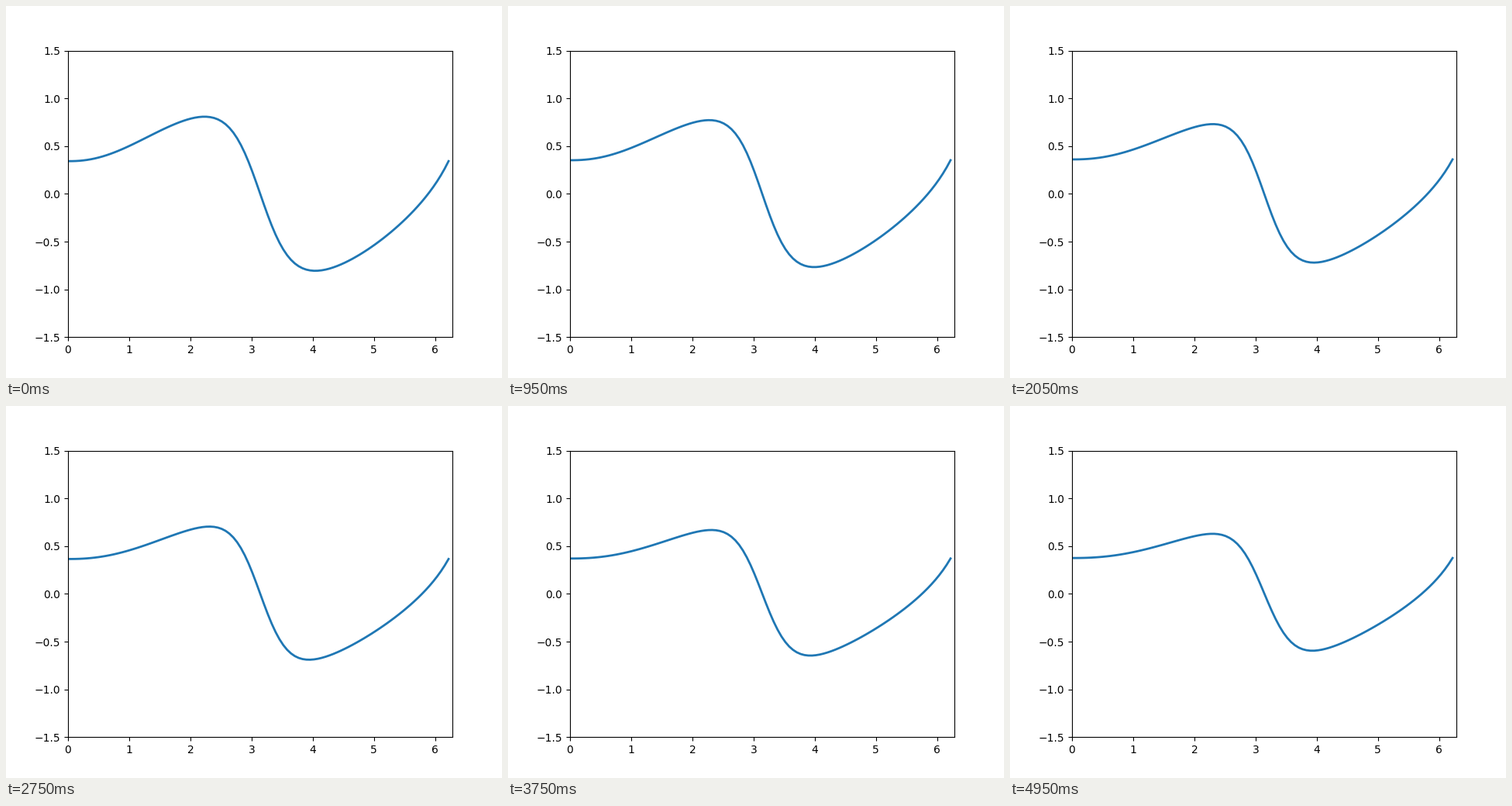
Animation, 640 px wide and 480 px high, one loop 5 s. Source, as a matplotlib script:

```python
import numpy as np
import matplotlib.pyplot as plt
from matplotlib.animation import FuncAnimation

POINTS = 100
FRAMES = 100
WARMUP = 103
DT = 0.01
LENGTH = 2 * np.pi

x = np.linspace(0, LENGTH, POINTS, endpoint=False)
dx = x[1] - x[0]


def step(u):
    """Advance the Burgers equation by one Lax-Friedrichs step."""
    flux = u**2 / 2
    new = np.empty_like(u)
    new[1:-1] = (u[2:] + u[:-2]) / 2 - DT / (2 * dx) * (flux[2:] - flux[:-2])
    new[0] = new[1]
    new[-1] = new[0]
    return new


def solve():
    u = np.sin(x)
    for _ in range(WARMUP):
        u = step(u)
    waves = [u]
    while len(waves) < FRAMES:
        waves.append(step(waves[-1]))
    return waves


waves = solve()

fig, ax = plt.subplots(figsize=(6.4, 4.8), dpi=100)
ax.set_xlim(0, LENGTH)
ax.set_ylim(-1.5, 1.5)
line, = ax.plot(x, waves[0], lw=2)


def update(i):
    line.set_ydata(waves[i])
    return line,


anim = FuncAnimation(fig, update, frames=FRAMES, interval=50,
                     repeat=True, repeat_delay=0)
plt.show()
```
